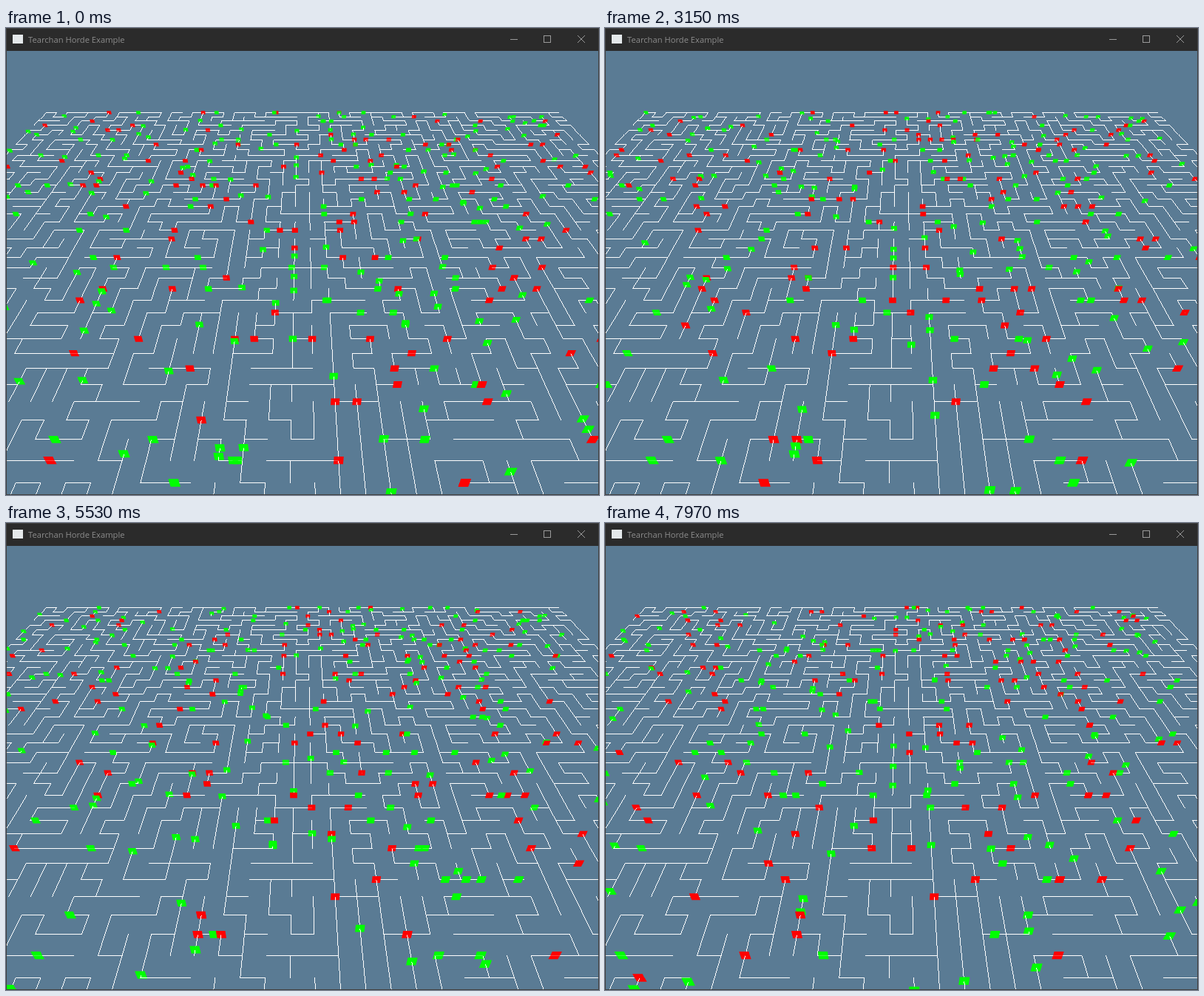
Recreate the animation shown at these times as an HTML page with a canvas. Size 802 by 632 pixels, loop 8 s.

```html
<!DOCTYPE html>
<html lang="en">
<head>
<meta charset="utf-8">
<title>Maze horde</title>
<style>
  html, body { margin: 0; width: 100%; height: 100%; overflow: hidden; background: #2b2b2b; }
  canvas { position: absolute; left: 0; top: 0; }
  #title {
    position: absolute; left: 30px; top: 0; white-space: nowrap;
    font: 11.2px/31px "Open Sans", "Noto Sans", sans-serif; color: #8c8c8c;
  }
</style>
</head>
<body>
<canvas id="stage" width="802" height="632"></canvas>
<div id="title">Tearchan Horde Example</div>
<script>
const LOOP = 8000, STEP = 61;
const COLS = 50, ROWS = 42, AGENTS = 450;
const WALK = 1000, MAX_REST = 5000, REST_CHANCE = 0.27;
const ctx = document.getElementById('stage').getContext('2d');

let seed = 20231;
function random() {
  seed = (seed + 0x6D2B79F5) | 0;
  let x = Math.imul(seed ^ (seed >>> 15), 1 | seed);
  x = (x + Math.imul(x ^ (x >>> 7), 61 | x)) ^ x;
  return ((x ^ (x >>> 14)) >>> 0) / 4294967296;
}
const pick = list => list[Math.floor(random() * list.length)];

// Corridors laid first, as col,row corner points; the rest grows at random.
const corridors = [
  [28,28, 26,28, 26,39], [27,33, 27,39], [29,34, 29,39],
  [25,15, 25,20], [25,22, 25,26], [24,21, 24,27], [25,29, 25,31],
  [19,28, 19,31], [20,28, 20,31], [21,28, 21,31], [22,28, 22,29],
  [19,34, 19,37], [20,34, 20,36, 21,36, 21,37, 22,37],
  [23,37, 26,37], [24,37, 24,38], [25,38, 25,39], [22,33, 26,33],
  [23,33, 23,35, 24,35, 24,36, 25,36, 25,34],
  [20,38, 18,38, 18,36, 19,36],
  [12,32, 12,34], [13,32, 13,34],
  [31,36, 34,36], [36,32, 36,35], [32,32, 32,33], [30,32, 30,33]
];

const cells = Array.from({ length: COLS * ROWS }, (_, i) => i);
const parent = cells.slice();
const links = cells.map(() => []);
const colOf = cell => cell % COLS;
const rowOf = cell => Math.floor(cell / COLS);

function root(cell) {
  while (parent[cell] !== cell) cell = parent[cell] = parent[parent[cell]];
  return cell;
}

function join(a, b) {
  if (root(a) === root(b)) return;
  parent[root(a)] = root(b);
  links[a].push(b);
  links[b].push(a);
}

function neighbours(cell) {
  const c = colOf(cell), r = rowOf(cell), list = [];
  if (c > 0) list.push(cell - 1);
  if (c < COLS - 1) list.push(cell + 1);
  if (r > 0) list.push(cell - COLS);
  if (r < ROWS - 1) list.push(cell + COLS);
  return list;
}

function layCorridor(points) {
  let cell = points[1] * COLS + points[0];
  for (let i = 2; i < points.length; i += 2) {
    const end = points[i + 1] * COLS + points[i];
    while (cell !== end) {
      const stride = rowOf(cell) === rowOf(end) ? 1 : COLS;
      const next = cell + Math.sign(end - cell) * stride;
      join(cell, next);
      cell = next;
    }
  }
}

// Depth-first growth: long winding corridors with few side branches.
function growFrom(start) {
  const path = [start];
  while (path.length) {
    const cell = path[path.length - 1];
    const open = neighbours(cell).filter(n => root(n) !== root(cell));
    if (open.length) {
      const next = pick(open);
      join(cell, next);
      path.push(next);
    } else {
      path.pop();
    }
  }
}

corridors.forEach(layCorridor);
growFrom(pick(cells));
cells.forEach(growFrom);

// Ground plane in perspective; upright edges converge at the nadir.
const CENTER = 401, HORIZON = -247.7, EYE = 65.433, NADIR = 1229;
const project = (col, row) => ({
  x: CENTER + (col - 24.5) * 925 / (EYE - row),
  y: HORIZON + 23667.5 / (EYE - row),
  scale: 925 / (EYE - row)
});

function drawMaze() {
  const layer = document.createElement('canvas');
  layer.width = 802;
  layer.height = 632;
  const pen = layer.getContext('2d');
  pen.fillStyle = '#fff';
  for (const a of cells) for (const b of links[a]) {
    if (b < a) continue;
    const p = project(colOf(a), rowOf(a)), q = project(colOf(b), rowOf(b));
    const top = Math.round(p.y), n = Math.max(1, Math.round(q.y) - top);
    if (rowOf(a) === rowOf(b)) {
      const left = Math.floor(p.x);
      pen.fillRect(left, top, Math.floor(q.x) - left + 1, 1);
    } else {
      for (let i = 0; i <= n; i++) pen.fillRect(Math.floor(p.x + (q.x - p.x) * i / n), top + i, 1, 1);
    }
  }
  return layer;
}

// An agent wanders along the maze, resting now and then.
function makeAgent() {
  const legs = [];
  let from = pick(cells), last = -1, time = -8000 - random() * 3000;
  while (time < LOOP) {
    if (random() < REST_CHANCE) {
      const length = random() * MAX_REST;
      legs.push({ time, length, from, to: from });
      time += length;
    }
    const ahead = links[from].filter(n => n !== last);
    const to = pick(ahead.length ? ahead : links[from]);
    legs.push({ time, length: WALK, from, to });
    time += WALK;
    last = from;
    from = to;
  }
  return legs.filter(leg => leg.time + leg.length > 0);
}

function locate(legs, time) {
  const { from, to, time: start, length } = legs.find(leg => time < leg.time + leg.length);
  const k = (time - start) / length;
  return {
    col: colOf(from) + (colOf(to) - colOf(from)) * k,
    row: rowOf(from) + (rowOf(to) - rowOf(from)) * k,
    resting: from === to
  };
}

// One half of an upright square standing halfway in the ground: side -1 is above, 1 below.
function drawHalf({ col, row, resting }, side) {
  const left = project(col - 0.2, row), right = project(col + 0.2, row);
  const y = left.y + 0.5, dy = side * 0.156 * left.scale;
  const toward = x => x + (CENTER - x) * dy / (NADIR - y);
  const base = side < 0 ? y + 0.6 : y;
  ctx.fillStyle = resting ? '#f00' : '#0f0';
  ctx.beginPath();
  ctx.moveTo(left.x, base);
  ctx.lineTo(toward(left.x), y + dy);
  ctx.lineTo(toward(right.x), y + dy);
  ctx.lineTo(right.x, base);
  ctx.fill();
}

function drawWindow() {
  ctx.fillStyle = '#404040';
  ctx.fillRect(0, 0, 802, 632);
  ctx.fillStyle = '#2b2b2b';
  ctx.fillRect(1, 1, 800, 30);
  ctx.fillStyle = '#e4e8ea';
  ctx.fillRect(9, 9, 14, 12);
  ctx.strokeStyle = '#9a9a9a';
  ctx.lineWidth = 1;
  ctx.strokeRect(727.5, 10.5, 9, 9);
  ctx.beginPath();
  ctx.moveTo(682, 15.5); ctx.lineTo(692, 15.5);
  ctx.moveTo(773, 10); ctx.lineTo(783, 20);
  ctx.moveTo(783, 10); ctx.lineTo(773, 20);
  ctx.stroke();
}

const maze = drawMaze();
const agents = Array.from({ length: AGENTS }, makeAgent);

function draw(time) {
  drawWindow();
  ctx.save();
  ctx.beginPath();
  ctx.rect(1, 31, 800, 600);
  ctx.clip();
  ctx.fillStyle = '#5a7b94';
  ctx.fillRect(1, 31, 800, 600);
  const places = agents.map(legs => locate(legs, time)).sort((a, b) => a.row - b.row);
  places.forEach(place => drawHalf(place, 1));
  ctx.drawImage(maze, 0, 0);
  places.forEach(place => drawHalf(place, -1));
  ctx.restore();
}

function tick() {
  const time = performance.now() % LOOP;
  draw(Math.floor(time / STEP) * STEP);
  requestAnimationFrame(tick);
}
tick();
</script>
</body>
</html>
```
